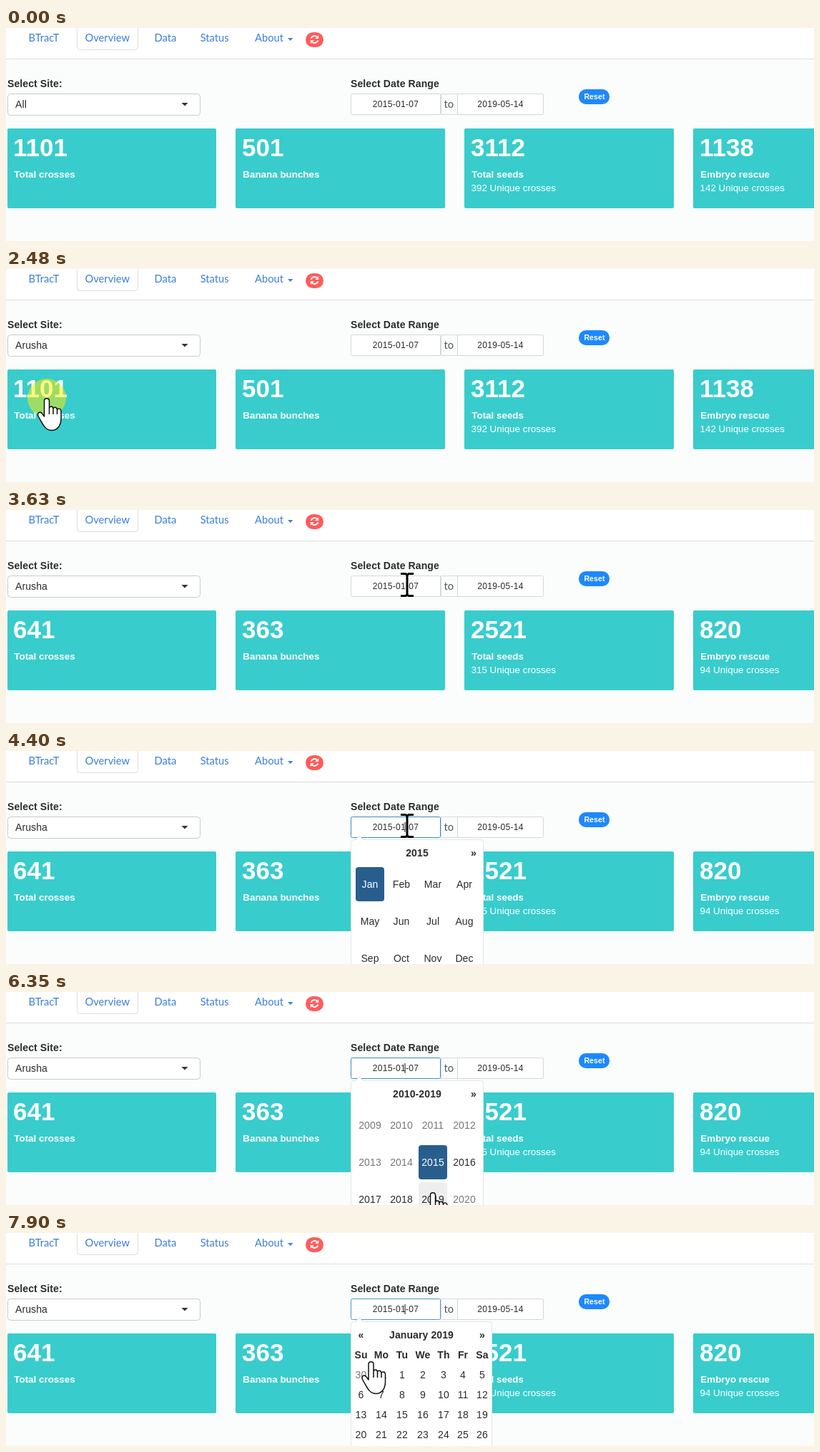
Recreate the animation shown at these times as an HTML page. Size 1130x299 px, loop 7.99 s.

```html
<!DOCTYPE html>
<html lang="en">
<head>
<meta charset="utf-8">
<title>Crossing dashboard</title>
<style>
  html, body { margin: 0; width: 100%; height: 100%; overflow: hidden; background: #fafdfc; }
  svg { display: block; }
  text { font: 14px "Liberation Sans", Arial, sans-serif; fill: #2b2b2b; letter-spacing: .1px; white-space: pre; }
  .nav { font: 14.7px Lato, sans-serif; fill: #3d7edb; letter-spacing: 0; }
  .bold { font-weight: bold; }
  .date { font-size: 12px; letter-spacing: .33px; }
  .mid { text-anchor: middle; }
  .off { fill: #777; }
  .num { font-size: 35px; font-weight: bold; fill: #fff; letter-spacing: 0; }
  .cap { font-size: 13.4px; fill: #fff; letter-spacing: 0; }
</style>
</head>
<body>
<svg id="stage" width="1130" height="299" viewBox="0 0 1130 299"></svg>
<script>
const LOOP = 7990;
const NS = 'http://www.w3.org/2000/svg';
const stage = document.getElementById('stage');

function add(parent, tag, attrs = {}, content) {
  const el = document.createElementNS(NS, tag);
  set(el, attrs);
  if (content !== undefined) el.textContent = content;
  parent.appendChild(el);
  return el;
}
function set(el, attrs) {
  for (const key in attrs) el.setAttribute(key, attrs[key]);
}
const group = parent => add(parent, 'g');
const box = (parent, x, y, width, height, fill, more = {}) =>
  add(parent, 'rect', { x, y, width, height, fill, ...more });
const path = (parent, d, more = {}) => add(parent, 'path', { d, ...more });
const label = (parent, x, y, str, cls = '') => add(parent, 'text', { x, y, class: cls }, str);
const show = (el, on) => { el.style.display = on ? '' : 'none'; };

// Navigation bar
box(stage, 0, 0, 1130, 299, '#fafdfc');
box(stage, 0, 0, 1130, 43, '#fff');
box(stage, 0, 43, 1130, 1, '#dcdede');
box(stage, 99.5, -10, 85, 40.5, '#fff', { rx: 4, stroke: '#ddd' });
[['BTracT', 31.5], ['Overview', 110.5], ['Data', 207.5], ['Status', 271.7], ['About', 348]]
  .forEach(([str, x]) => label(stage, x, 19, str, 'nav'));
path(stage, 'M394 14h7.4l-3.7 4z', { fill: '#3d7edb' });
box(stage, 419, 6, 25, 21, '#ff5b5b', { rx: 10.5 });
path(stage, 'M426.6 14.6a5 5 0 0 1 8.4-2M436.4 17.4a5 5 0 0 1-8.4 2',
  { fill: 'none', stroke: '#fff', 'stroke-width': 2 });
path(stage, 'M437.2 10v5h-5zM425.8 22v-5h5z', { fill: '#fff' });

// Filters
label(stage, 2, 83, 'Select Site:', 'bold');
label(stage, 482, 83, 'Select Date Range', 'bold');
box(stage, 2.5, 92.5, 269, 30, '#fff', { rx: 4, stroke: '#c8cbcb' });
const siteText = label(stage, 13, 112, 'All');
const arrow = path(stage, '', { fill: '#333' });
box(stage, 608.5, 92.5, 23, 29, '#fafcfc', { stroke: '#d8dada' });
label(stage, 612.5, 112, 'to', 'nav').style.fill = '#555';
box(stage, 631.5, 92.5, 120, 29, '#fff', { rx: 2, stroke: '#d4d7d7' });
const dateBox = box(stage, 482.5, 92.5, 125, 29, '#fff', { rx: 2 });
label(stage, 545, 111, '2015-01-07', 'date mid');
label(stage, 691.5, 111, '2019-05-14', 'date mid');
const caret = box(stage, 557.5, 100, 1, 14, '#111');
box(stage, 801, 86, 43, 21, '#1e88fe', { rx: 10 });
const reset = label(stage, 823, 100, 'Reset', 'bold mid');
reset.style.fontSize = '10.5px';
reset.style.fill = '#fff';

// Value cards: caption, value and unique count before and after filtering
const cards = [
  ['Total crosses', [1101, 641]],
  ['Banana bunches', [501, 363]],
  ['Total seeds', [3112, 2521], [392, 315]],
  ['Embryo rescue', [1138, 820], [142, 94]]
].map(([caption, values, unique], i) => {
  const x = 10.5 + 320 * i;
  box(stage, i ? x - 9.5 : 2, 141, i ? 293 : 292, 112, '#39cccc', { rx: 2 });
  label(stage, x + .8, 210, caption, 'cap bold');
  return {
    values, unique,
    num: label(stage, x - .5, 180, '', 'num'),
    sub: label(stage, x, 229, '', 'cap')
  };
});

// Site list
const list = group(stage);
list.style.filter = 'drop-shadow(0 3px 3px rgba(0,0,0,.15))';
box(list, 2.5, 122.5, 269, 88, '#fff', { rx: 4, stroke: '#ccc' });
const rowMark = box(list, 3, 126, 268, 27.5, '#f5f5f5');
['All', 'Arusha', 'Ibadan'].forEach((str, i) => label(list, 15, 145 + 27.5 * i, str));

// Date picker
const picker = group(stage);
const panel = box(picker, 482.5, 124.5, 185, 200, '#fff', { rx: 4, stroke: '#e2e6e6' });
path(picker, 'M488 125l6-6 6 6', { fill: '#fff', stroke: '#d5d9d9' });
const hover = box(picker, 0, 0, 0, 0, '#eee', { rx: 4 });

const cellAt = (col, row) => [489 + 44 * col, 163 + 52 * row, 40, 48];
function gridView(title, items, active, isOff, hasPrev) {
  const g = group(picker);
  label(g, 575, 148, title, 'bold mid');
  label(g, 654, 148, '»', 'bold mid');
  if (hasPrev) label(g, 496.5, 148, '«', 'bold mid');
  items.forEach((item, i) => {
    const col = i % 4, row = i >> 2;
    const [x, y, w, h] = cellAt(col, row);
    if (i === active) box(g, x, y, w, h, '#285e8e', { rx: 4 });
    const text = label(g, x + 20, y + 29, item, isOff(item) ? 'mid off' : 'mid');
    if (i === active) text.style.fill = '#fff';
  });
  return { g, width: 185, grid: true, active, enabled: i => !isOff(items[i]) };
}
function dayView() {
  const g = group(picker);
  const cols = [496.5, 525, 554, 583, 612, 639, 666];
  label(g, 581, 148, 'January 2019', 'bold mid');
  label(g, 496.5, 148, '«', 'bold mid');
  label(g, 666, 148, '»', 'bold mid');
  cols.forEach((x, c) => {
    label(g, x, 176, 'SuMoTuWeThFrSa'.substr(c * 2, 2), 'bold mid');
    for (let r = 0; r < 4; r++) {
      const day = r * 7 + c - 1;
      label(g, x, 204 + 28 * r, day < 1 ? day + 31 : day, day < 1 ? 'mid off' : 'mid');
    }
  });
  return { g, width: 197, grid: false };
}
const months = 'Jan Feb Mar Apr May Jun Jul Aug Sep Oct Nov Dec'.split(' ');
const years = Array.from({ length: 12 }, (_, i) => 2009 + i);
const views = {
  first: gridView('2015', months, 0, () => false, false),
  decade: gridView('2010-2019', years, 6, y => y < 2015 || y > 2019, false),
  second: gridView('2019', months, -1, () => false, true),
  days: dayView()
};

// Pointer
const halo = add(stage, 'circle', { r: 27, fill: 'rgb(255,240,0)', 'fill-opacity': .5 });
const hand = group(stage);
path(hand, 'M10 25V4C10-.5 17-.5 17 4V15C17 11 22.5 11 22.5 15.5C23 12 28 12.5 28 17' +
  'C29 14 33.5 14.5 33.5 18.5V29C33.5 39 28 45.5 20.5 45.5C14 45.5 11 42 8 37L2 26.5' +
  'C-1 21 4 18 7 22L10 26ZM17 15V23M22.5 15.5V23M28 17V23',
  { fill: '#fff', stroke: '#111', 'stroke-width': 1.5, 'stroke-linejoin': 'round' });
const beam = group(stage);
path(beam, 'M-9-15.5h7l2 2 2-2h7M0-14V14M-9 15.5h7l2-2 2 2h7',
  { fill: 'none', stroke: '#000', 'stroke-width': 3 });

// Timelines: [time, value] holds until the next entry
const at = (steps, t) => steps.reduce((v, [time, next]) => (t >= time ? next : v), steps[0][1]);

const focusSteps = [[0, 0], [4240, .5], [4320, 1]];
[5180, 6500, 7680].forEach(t =>
  focusSteps.push([t, .8], [t + 70, .45], [t + 150, .7], [t + 225, 1]));
focusSteps.push([7900, .85]);
const caretSteps = [[0, 0], [4240, 1], [4870, 0], [5410, 1], [5830, 0], [6350, 1],
  [6580, 0], [6660, 1], [7190, 0], [7450, 1], [7760, 0], [7830, 1]];
const viewSteps = [[0, ''], [4240, 'first'], [5330, 'decade'], [6660, 'second'], [7830, 'days']];
const clicks = [[1530, 1760], [2480, 2630], [4240, 4400], [5180, 5250], [6500, 6580], [7680, 7760]];

// Pointer moves: start, end, number of steps, x, y
const moves = [
  [310, 310, 1, 365, 225], [380, 380, 1, 340.5, 219], [690, 1380, 10, 147, 109.5],
  [1530, 1530, 1, 149, 110], [1620, 1620, 1, 132, 121], [1760, 2240, 7, 57, 181],
  [2940, 3090, 3, 490, 130], [3400, 3630, 4, 561, 105], [4640, 5010, 6, 570.5, 139.5],
  [5760, 6350, 9, 597, 281], [7040, 7450, 6, 510.5, 180]
];
function pointer(t) {
  let x = 365, y = 225;
  for (const [from, to, n, tx, ty] of moves) {
    if (t < from) break;
    const step = to > from ? Math.floor((t - from) / (to - from) * (n - 1) + 1e-6) + 1 : n;
    const p = Math.min(1, step / n);
    const e = p * p * (3 - 2 * p);
    x += (tx - x) * e;
    y += (ty - y) * e;
  }
  return [x, y];
}
const inside = (x, y, [bx, by, w, h]) => x >= bx && x < bx + w && y >= by && y < by + h;

function hoverRect(view, x, y) {
  if (!view || !view.grid) return null;
  const title = [509, 129, 131, 28];
  if (inside(x, y, title)) return title;
  const col = Math.floor((x - 489) / 44), row = Math.floor((y - 163) / 52);
  if (col < 0 || col > 3 || row < 0 || row > 2) return null;
  const i = row * 4 + col, cell = cellAt(col, row);
  return i !== view.active && view.enabled(i) && inside(x, y, cell) ? cell : null;
}
const mix = (a, b, p) => 'rgb(' + a.map((v, i) => Math.round(v + (b[i] - v) * p)) + ')';

function draw(t) {
  const [x, y] = pointer(t);
  const listOpen = t >= 1530 && t < 2480;
  const filtered = t >= 2940 ? 1 : 0;

  siteText.textContent = t < 2480 ? 'All' : 'Arusha';
  set(arrow, { d: listOpen ? 'M245.5 109h9l-4.5-4.5z' : 'M245.5 105h9l-4.5 4.5z' });
  show(list, listOpen);
  set(rowMark, { y: y < 153 ? 126 : 153.5 });
  for (const c of cards) {
    c.num.textContent = c.values[filtered];
    c.sub.textContent = c.unique ? c.unique[filtered] + ' Unique crosses' : '';
  }

  set(dateBox, { stroke: mix([212, 215, 215], [60, 141, 188], at(focusSteps, t)) });
  show(caret, at(caretSteps, t));

  const name = at(viewSteps, t), view = views[name];
  show(picker, view);
  for (const key in views) show(views[key].g, key === name);
  if (view) set(panel, { width: view.width });
  const mark = hoverRect(view, x, y);
  show(hover, mark);
  if (mark) set(hover, { x: mark[0], y: mark[1], width: mark[2], height: mark[3] });

  const typing = inside(x, y, [482, 92, 126, 30]);
  show(hand, t >= 310 && !typing);
  show(beam, typing);
  set(hand, { transform: `translate(${x - 13.5} ${y})` });
  set(beam, { transform: `translate(${x} ${y})` });
  show(halo, clicks.some(([a, b]) => t >= a && t < b));
  set(halo, { cx: x, cy: y });
}

function tick() {
  draw(performance.now() % LOOP);
  requestAnimationFrame(tick);
}
tick();
</script>
</body>
</html>
```
